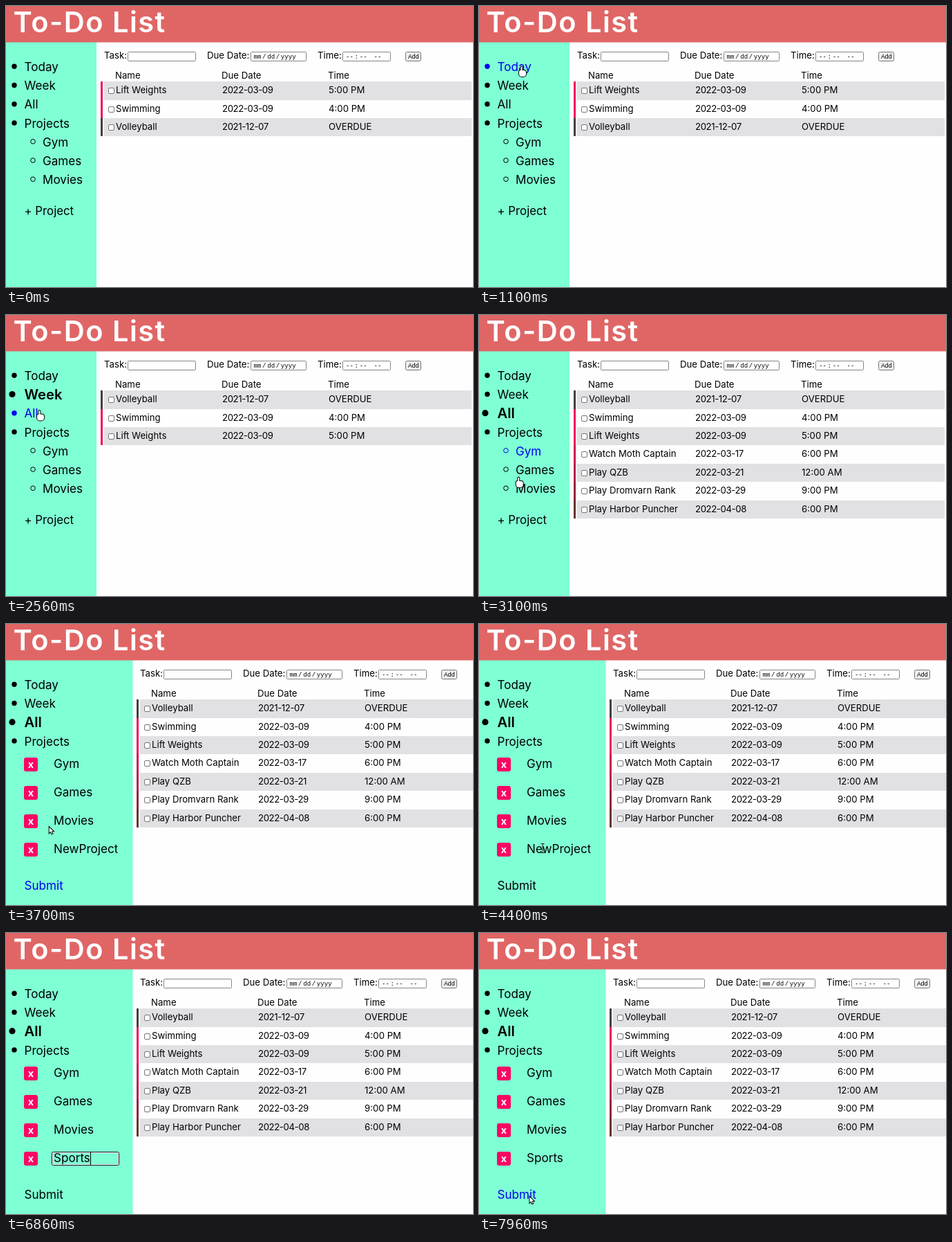
Animation of 676x406 px, one loop 8 s. Source, as an HTML page with a canvas:

```html
<!DOCTYPE html>
<html lang="en">
<head>
<meta charset="utf-8">
<title>To-Do List</title>
<style>
html, body { margin: 0; width: 100%; height: 100%; overflow: hidden; background: #fefefe; }
canvas { display: block; }
</style>
</head>
<body>
<canvas id="stage" width="676" height="406"></canvas>
<script>
const ctx = document.getElementById('stage').getContext('2d');
const LOOP = 8000, HOVER_LAG = 80;
const SANS = 'Inter, "Open Sans", sans-serif', MONO = '"Liberation Mono", monospace';
const BLUE = '#0000f0', PINK = '#fb0464', MINT = '#7fffd4';
const MAIN = 13.2, SIDE = 17.1;

const tasks = [
  ['Volleyball', '2021-12-07', 'OVERDUE'],
  ['Swimming', '2022-03-09', '4:00 PM'],
  ['Lift Weights', '2022-03-09', '5:00 PM'],
  ['Watch Moth Captain', '2022-03-17', '6:00 PM'],
  ['Play QZB', '2022-03-21', '12:00 AM'],
  ['Play Dromvarn Rank', '2022-03-29', '9:00 PM'],
  ['Play Harbor Puncher', '2022-04-08', '6:00 PM'],
];
const menu = ['Today', 'Week', 'All', 'Projects'];
const projects = ['Gym', 'Games', 'Movies'];

const TODAY = 1330, WEEK = 2130, ALL = 2860;
const EDIT = 3700, FOCUS = 4530, SELECT = 5600, TYPE = 6200, KEY_GAP = 132, IDLE = 7200, BLUR = 7930;

const menuY = i => 88 + i * 27.2;

// pointer moves: start, end, x, y
const moves = [
  [660, 1100, 61, menuY(0) - 1],
  [1500, 1730, 58, menuY(1)],
  [WEEK, 2560, 48, menuY(2) - 5],
  [ALL, 3530, 62, 292],
  [EDIT, 4130, 95, 321],
  [4300, FOCUS, 91, 324.5],
  [7500, 7960, 73, 380],
];

function pointerAt(t) {
  let x = -14, y = 200;
  for (const [start, end, toX, toY] of moves) {
    const u = Math.min(1, Math.max(0, (t - start) / (end - start)));
    const k = 1 - (1 - u) ** 2.2;
    x += (toX - x) * k;
    y += (toY - y) * k;
  }
  return [x, y];
}

function viewAt(t) {
  if (t < TODAY) return [-1, tasks.slice(0, 3).reverse()];
  if (t < WEEK) return [0, tasks.slice(1, 3)];
  if (t < ALL) return [1, tasks.slice(0, 3)];
  return [2, tasks];
}

// fades from pink to brown as the due date gets further away
function urgency(date) {
  const days = (Date.parse(date) - Date.parse('2022-03-09')) / 864e5;
  if (days < 0) return '#3e4044';
  const mix = (a, b) => a + (b - a) * days / 30;
  return `rgb(${mix(240, 100)}, ${mix(10, 52)}, ${mix(96, 44)})`;
}

function rect(x, y, w, h, color) {
  ctx.fillStyle = color;
  ctx.fillRect(x, y, w, h);
}

function text(s, x, y, size, color = '#000', weight = 400, family = SANS, spacing = 0) {
  ctx.font = `${weight} ${size}px ${family}`;
  ctx.letterSpacing = spacing + 'px';
  ctx.fillStyle = color;
  ctx.fillText(s, x, y);
}

function mono(s, x) {
  ctx.wordSpacing = '-3.8px';
  text(s, x, 76, 9.1, '#000', 400, MONO);
  ctx.wordSpacing = '0px';
}

function box(x, y, w, h, radius, fill, stroke) {
  ctx.beginPath();
  ctx.roundRect(x + .5, y + .5, w - 1, h - 1, radius);
  ctx.fillStyle = fill;
  ctx.fill();
  ctx.strokeStyle = stroke;
  ctx.stroke();
}

function dot(x, y, r, color, hollow) {
  ctx.beginPath();
  ctx.arc(x, y, r, 0, Math.PI * 2);
  ctx.fillStyle = ctx.strokeStyle = color;
  hollow ? ctx.stroke() : ctx.fill();
}

function drawForm() {
  const field = (label, x, inputX, w) => {
    text(label, x, 75.7, MAIN);
    box(inputX, 66, w, 14, 1, '#fff', '#858585');
  };
  field('Task:', 142, 176, 99);
  field('Due Date:', 291, 354, 81);
  field('Time:', 451, 487, 70);
  mono('mm / dd / yyyy', 358.5);
  mono('-- : --      --', 492);
  box(578, 66, 23, 14, 2, '#efefef', '#767676');
  text('Add', 582, 76, 8.7, '#000', 400, '"Liberation Sans", sans-serif');
}

function drawTasks(list) {
  const rowY = i => Math.round(109.2 + i * 26.4);
  ['Name', 'Due Date', 'Time'].forEach((title, i) => text(title, 158 + i * 154, 105, MAIN));
  list.forEach(([name, date, time], i) => {
    const top = rowY(i), height = rowY(i + 1) - top, base = top + 17.2;
    if (i % 2 == 0) rect(142, top, 532, height, '#e1e1e4');
    rect(137, top, 3, height, urgency(date));
    box(148, top + 9, 9, 9, 1.5, '#fff', '#767676');
    text(name, 159, base, MAIN);
    text(date, 313, base, MAIN, '#000', 400, SANS, -.4);
    text(time, 467, base, MAIN);
  });
}

function drawMenu(active, hover) {
  menu.forEach((name, i) => {
    const y = menuY(i), on = i == active;
    const color = hover == i && i < 3 ? BLUE : '#000';
    dot(on ? 9 : 12, y - .7, on ? 4.6 : 3.7, color);
    text(name, 26.5, y + (on ? 7 : 6), on ? 20.2 : SIDE, color, on ? 600 : 400);
  });
}

function drawProjects(hover, pointerY) {
  projects.forEach((name, i) => {
    const color = hover == i + 4 ? BLUE : '#000';
    const y = menuY(i + 4);
    dot(39, y - 1, 3.3, color, true);
    text(name, 53, y + 5.8, SIDE, color);
  });
  text('+ Project', 26.5, 301.5, 16.8, pointerY > 284 ? BLUE : '#000');
}

function drawEditor(t, pointerY) {
  const typed = Math.max(0, Math.floor((t - TYPE) / KEY_GAP) + 1);
  const label = typed ? 'Sports'.slice(0, typed) : 'NewProject';
  const selected = t >= SELECT && !typed;

  if (t >= FOCUS && t < BLUR) {
    box(66, 316, 98, 20, 2, MINT, selected ? '#0a60b4' : '#101010');
    box(67, 317, 96, 18, 1, MINT, '#fff');
  }
  if (selected) rect(68, 317, 94, 18, '#0878d8');

  ctx.save();
  ctx.beginPath();
  ctx.rect(0, 180, 161.5, 170);
  ctx.clip();
  [...projects, label].forEach((name, i) => {
    const top = 193 + i * 41;
    ctx.beginPath();
    ctx.roundRect(26, top, 20, 20, 3);
    ctx.fillStyle = PINK;
    ctx.fill();
    text('x', 31.7, top + 14.5, 14.5, '#fff', 700);
    text(name, 69, top + 15, SIDE, selected && i == 3 ? '#fff' : '#000');
  });
  ctx.font = `${SIDE}px ${SANS}`;
  const end = Math.round(69 + ctx.measureText(label).width);
  ctx.restore();

  if (t >= FOCUS && t < FOCUS + 530) rect(92, 317, 1, 18, '#000');
  if (typed && t < 7330) rect(end, 317, 1, 18, '#000');
  text('Submit', 26.5, 383.5, SIDE, t < EDIT + HOVER_LAG || pointerY > 364 ? BLUE : '#000');
}

function drawShape(path) {
  ctx.lineWidth = 2;
  ctx.strokeStyle = '#000';
  ctx.stroke(path);
  ctx.fillStyle = '#fff';
  ctx.fill(path);
  ctx.lineWidth = 1;
}

function drawPointer(t) {
  if (t >= TYPE && t < IDLE) return;
  const [x, y] = pointerAt(t);
  ctx.save();
  ctx.translate(x, y);
  if (t < EDIT) {
    const hand = new Path2D();
    hand.roundRect(-.5, .5, 2, 9, 1);
    hand.roundRect(-3, 6, 10, 9, [2, 3, 4, 4]);
    drawShape(hand);
  } else if (x > 66 && y > 314 && y < 338) {
    rect(-.5, -6, 1, 13, '#222');
    rect(-2.5, -6.5, 5, 1, '#222');
    rect(-2.5, 6.5, 5, 1, '#222');
  } else {
    drawShape(new Path2D('M.5 1.5v8l2-1.8 1.6 3.4 1-.5-1.5-3.3 2.6-.2z'));
  }
  ctx.restore();
}

function draw(t) {
  const editing = t >= EDIT;
  const [active, list] = viewAt(t);
  const [hoverX, hoverY] = pointerAt(t - HOVER_LAG);
  const hover = editing || hoverX < 8 ? -1 : Math.floor((hoverY - 74.4) / 27.2);

  rect(0, 0, 676, 406, '#fefefe');
  ctx.save();
  ctx.translate(editing ? 52 : 0, 0);
  drawForm();
  drawTasks(list);
  ctx.restore();

  rect(0, 52, editing ? 183.5 : 131, 354, MINT);
  rect(0, 0, 676, 52.5, '#e06666');
  text('To-Do List', 10.5, 37.5, 41.5, '#fff', 600, SANS, 1.5);
  drawMenu(active, hover);
  if (editing) drawEditor(t, hoverY);
  else drawProjects(hover, hoverY);
  drawPointer(t);
}

const start = performance.now();
function frame() {
  draw((performance.now() - start) % LOOP);
  requestAnimationFrame(frame);
}
frame();
</script>
</body>
</html>
```
